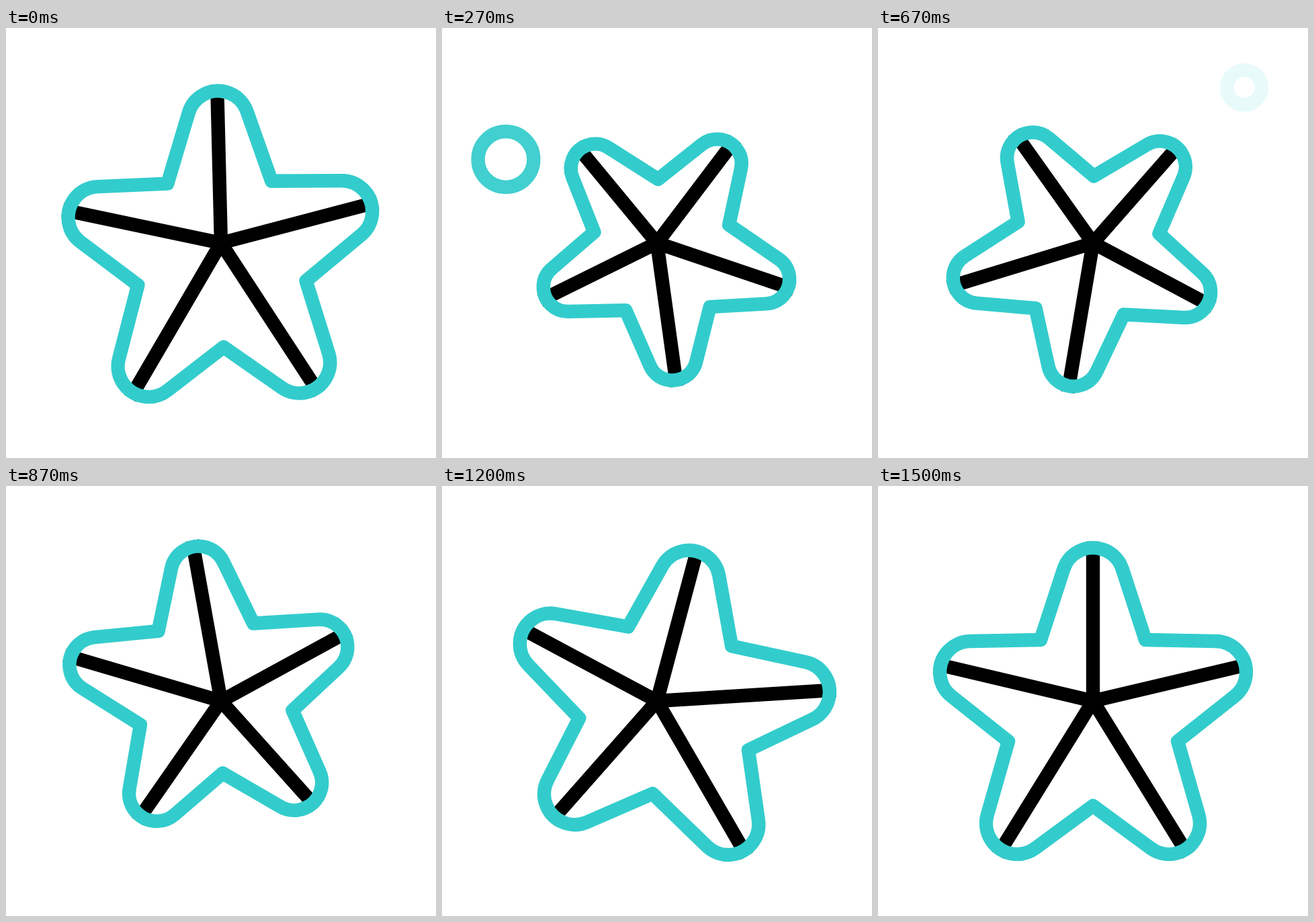
Write an HTML page with a canvas that moves like this. It is 640 by 640 pixels and loops after 1670 ms.

```html
<!DOCTYPE html>
<html lang="en">
<head>
<meta charset="utf-8">
<title>Starfish</title>
<style>
  html, body { margin: 0; width: 100%; height: 100%; overflow: hidden; background: #fff; }
  canvas { display: block; width: 640px; height: 640px; }
</style>
</head>
<body>
<canvas id="stage" width="640" height="640"></canvas>
<script>
const ctx = document.getElementById("stage").getContext("2d");
const TEAL = "#33cccc";
const STROKE = 20.4;
const LOOP = 1670;
const LAST_STEP = 46;
const CAP_RADIUS = 46;

// Geometry relative to the centre of the star, clockwise from the top arm.
const CAPS = [[0, -182], [182, -43], [113, 182], [-113, 182], [-182, -43]];
const NOTCHES = [[78, -91], [126, 60], [0, 156], [-126, 60], [-78, -91]];
const RIBS = [[0, -228], [227, -53.5], [137, 221.6], [-137, 221.6], [-227, -53.5]];

// Keys are [step, value], eased in and out between neighbours.
const TURN = [[-0.2, 0], [10.75, -42.5], [45.64, 360]];
const SIZE = [[-0.2, 1], [11.1, 0.771], [41, 1]];
const FADE = [[7, 1], [18.9, 0]];
const RING = [[5.8, 0], [10.5, 54.5], [22.1, 0]];

const BUBBLES = [
  { x: 95, top: 166.5, delay: 0 },
  { x: 545, top: 86.1, delay: 4.5 }
];

const smooth = u => u * u * (3 - 2 * u);

function valueAt(keys, step) {
  if (step <= keys[0][0]) return keys[0][1];
  for (let i = 1; i < keys.length; i++) {
    const [t0, v0] = keys[i - 1];
    const [t1, v1] = keys[i];
    if (step < t1) return v0 + (v1 - v0) * smooth((step - t0) / (t1 - t0));
  }
  return keys[keys.length - 1][1];
}

// Angle at which a line from a notch touches the cap circle.
function tangentAngle(cap, notch, side) {
  const dx = notch[0] - cap[0];
  const dy = notch[1] - cap[1];
  return Math.atan2(dy, dx) + side * Math.acos(CAP_RADIUS / Math.hypot(dx, dy));
}

function outline(scale) {
  ctx.beginPath();
  CAPS.forEach((cap, i) => {
    const before = NOTCHES[(i + 4) % 5];
    const after = NOTCHES[i];
    ctx.arc(cap[0] * scale, cap[1] * scale, CAP_RADIUS * scale,
      tangentAngle(cap, before, 1), tangentAngle(cap, after, -1));
    ctx.lineTo(after[0] * scale, after[1] * scale);
  });
  ctx.closePath();
}

function drawStar(step) {
  const scale = valueAt(SIZE, step);
  ctx.save();
  ctx.translate(320, 320);
  ctx.rotate(valueAt(TURN, step) * Math.PI / 180);
  ctx.lineWidth = STROKE;

  ctx.strokeStyle = "#000";
  ctx.beginPath();
  for (const [x, y] of RIBS) {
    const reach = scale + 9.2 / Math.hypot(x, y);
    ctx.moveTo(0, 0);
    ctx.lineTo(x * reach, y * reach);
  }
  ctx.stroke();

  ctx.strokeStyle = TEAL;
  ctx.lineJoin = "round";
  outline(scale);
  ctx.stroke();
  ctx.restore();
}

function drawBubble({ x, top, delay }, step) {
  const age = step - delay;
  const radius = valueAt(RING, age);
  const alpha = valueAt(FADE, age);
  if (radius <= 0 || alpha <= 0) return;
  const y = top + 0.2625 * (19.5 - age) ** 2;
  ctx.save();
  ctx.globalAlpha = alpha;
  ctx.strokeStyle = TEAL;
  ctx.lineWidth = STROKE;
  ctx.beginPath();
  ctx.arc(x, y, radius, 0, Math.PI * 2);
  ctx.stroke();
  ctx.restore();
}

function draw(time) {
  // Thirty steps per second, then a rest on the last pose.
  const step = Math.min(LAST_STEP, 1 + Math.floor((time + 4) * 0.03));
  ctx.fillStyle = "#fff";
  ctx.fillRect(0, 0, 640, 640);
  BUBBLES.forEach(bubble => drawBubble(bubble, step));
  drawStar(step);
}

const start = performance.now();
function tick() {
  draw((performance.now() - start) % LOOP);
  requestAnimationFrame(tick);
}
tick();
</script>
</body>
</html>
```
